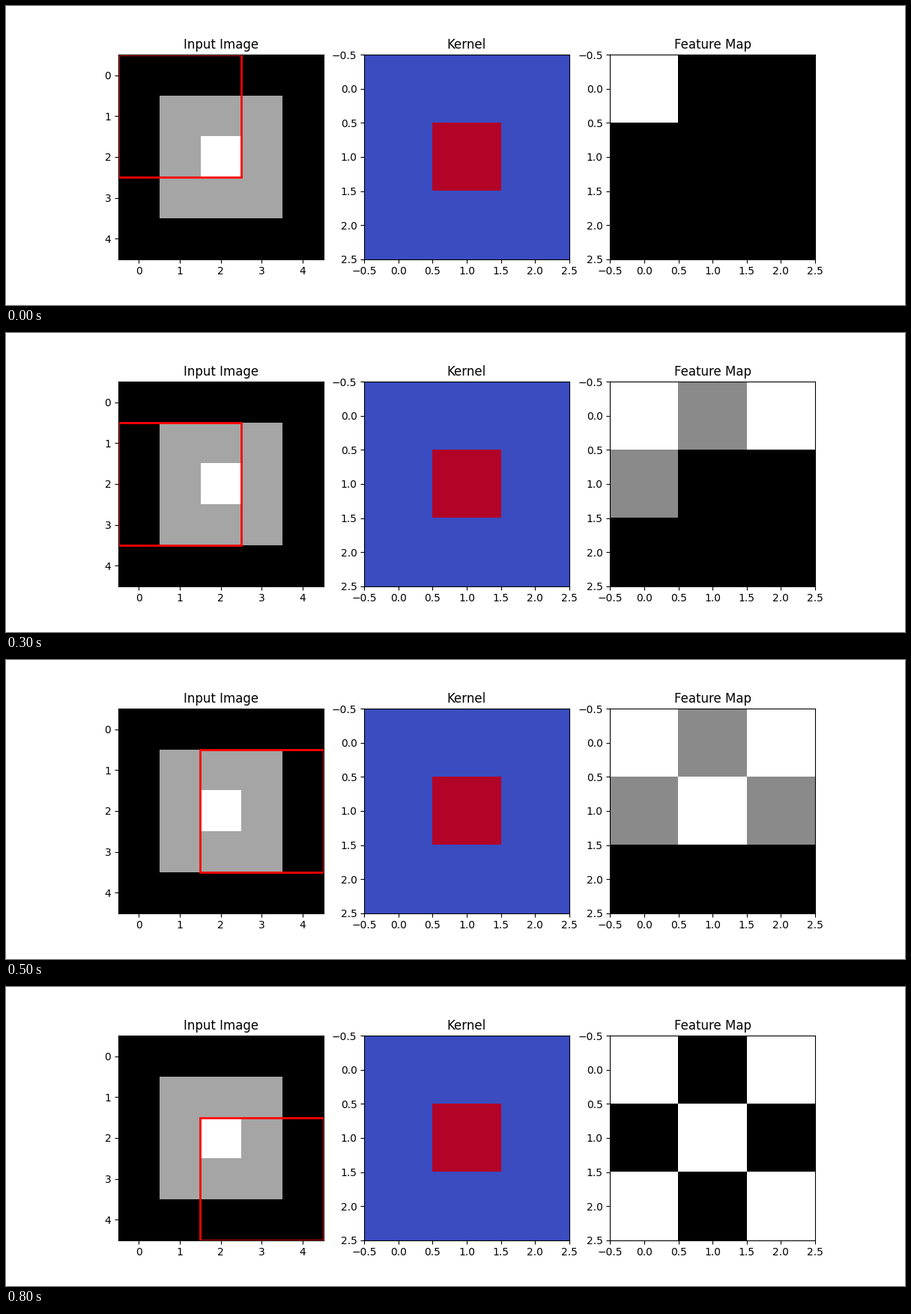
Write a matplotlib script that moves like this. It is 1200 px wide and 400 px high and loops after 900 ms.

```python
import numpy as np
import matplotlib.pyplot as plt
from matplotlib.animation import FuncAnimation
from matplotlib.patches import Rectangle

SIZE, K = 5, 3
OUT = SIZE - K + 1

image = np.zeros((SIZE, SIZE))
image[1:4, 1:4] = 165 / 255
image[2, 2] = 1

kernel = -np.ones((K, K))
kernel[1, 1] = 8

# Response levels: strong at the corners and centre, weaker along the sides
response = np.ones((OUT, OUT))
response.flat[1::2] = 138 / 255

fig, axes = plt.subplots(1, 3, figsize=(12, 4), dpi=100)
titles = ("Input Image", "Kernel", "Feature Map")
grids = (image, kernel, np.zeros((OUT, OUT)))
cmaps = ("gray", "coolwarm", "gray")
views = []
for ax, title, grid, cmap in zip(axes, titles, grids, cmaps):
    views.append(ax.imshow(grid, cmap=cmap))
    ax.set_title(title)

window = Rectangle((-0.5, -0.5), K, K, lw=2, edgecolor="red", facecolor="none")
axes[0].add_patch(window)


def update(step):
    row, col = divmod(step, OUT)
    window.set_xy((col - 0.5, row - 0.5))
    done = np.arange(OUT * OUT).reshape(OUT, OUT) <= step
    fmap = np.where(done, response, 0)
    views[2].set_data(fmap)
    views[2].set_clim(fmap.min(), fmap.max())
    return window, views[2]


anim = FuncAnimation(fig, update, frames=OUT * OUT, interval=100,
                     repeat=True, repeat_delay=0, blit=False)
plt.show()
```
